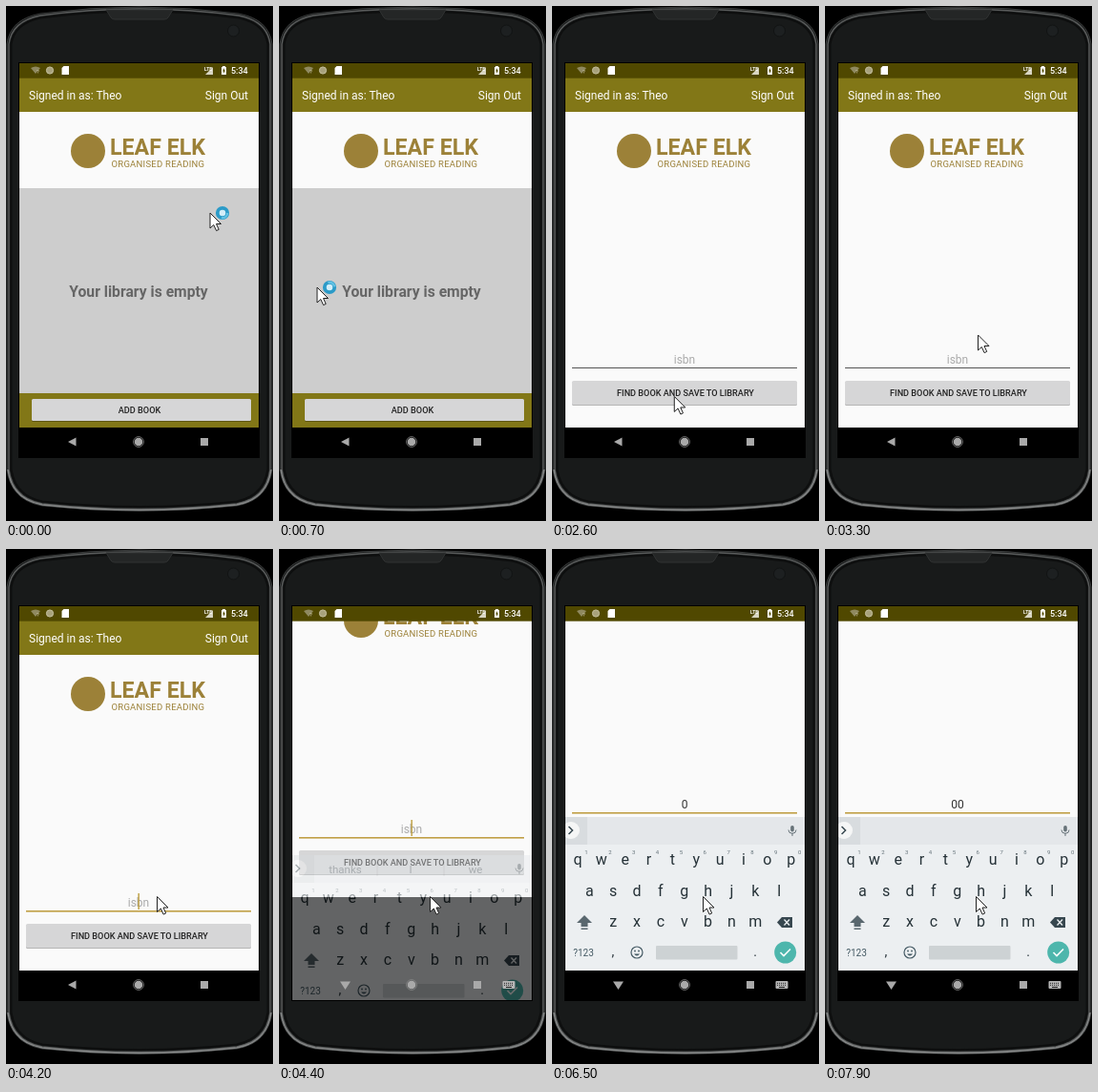
An HTML page that plays this animation: 280x540 px, repeating every 8000 ms.

```html
<!DOCTYPE html>
<html lang="en">
<head>
<meta charset="utf-8">
<title>Library app demo</title>
<style>
  html, body { margin: 0; width: 100%; height: 100%; overflow: hidden; background: #000; }
  svg { display: block; width: 280px; height: 540px; font-family: Roboto, "Noto Sans", sans-serif; }
  .wordmark { font-weight: 700; font-stretch: 75%; }
</style>
</head>
<body>
<svg id="stage" viewBox="0 0 280 540"></svg>
<script>
const LOOP = 8000, STEP = 100;
const OLIVE = '#827717', GOLD = '#9c8138';

const rect = (x, y, w, h, fill, extra = '') =>
  `<rect x="${x}" y="${y}" width="${w}" height="${h}" fill="${fill}" ${extra}/>`;
const circle = (x, y, r, fill, extra = '') =>
  `<circle cx="${x}" cy="${y}" r="${r}" fill="${fill}" ${extra}/>`;
const path = (d, fill, extra = '') => `<path d="${d}" fill="${fill}" ${extra}/>`;
const text = (x, y, size, fill, label, extra = '') =>
  `<text x="${x}" y="${y}" font-size="${size}" fill="${fill}" ${extra}>${label}</text>`;
const centered = (x, y, size, fill, label, extra = '') =>
  text(x, y, size, fill, label, `text-anchor="middle" ${extra}`);
const group = (id, body, extra = '') => `<g id="${id}" ${extra}>${body}</g>`;

const button = (x, y, w, h, label) =>
  rect(x, y + 1, w, h, '#000', 'rx="1.5" opacity=".28"') +
  rect(x, y, w, h, '#d6d6d7', 'rx="1.5"') +
  centered(140, y + h / 2 + 3.5, 9.15, '#222', label, 'font-weight="500"');

// Arched outline of the phone, inset from its outer edge.
const topArch = i => `${1 + i} 40Q${4 + i} ${14 + i} 36 ${8 + i}Q140 ${i - 6} 244 ${8 + i}Q${276 - i} ${14 + i} ${279 - i} 40`;
const bottomArch = i => `${279 - i} 486Q${275 - i} ${518 - i} 242 ${524 - i}Q140 ${535 - i} 38 ${524 - i}Q${5 + i} ${518 - i} ${1 + i} 486`;
const outline = i => `M${topArch(i)}L${bottomArch(i)}Z`;

const phone =
  path(outline(0), '#181a1a', 'stroke="#3a3c3c" stroke-width="1"') +
  path(outline(2), 'none', 'stroke="#5a5c5c" stroke-width="1.4"') +
  path(outline(4.5), 'none', 'stroke="#0d0e0e" stroke-width="2"') +
  path(`M${bottomArch(1)}`, 'none', 'stroke="#858787" stroke-width="1.5"') +
  path('M105 4H175L170 12Q169 14 166 14H114Q111 14 110 12Z', '#242626', 'stroke="#303232"') +
  circle(238.5, 26, 6, '#1d2021', 'stroke="#121414"') +
  rect(13, 59, 253, 415, '#000');

const statusBar =
  rect(14, 60, 251, 15.7, '#504800') +
  path('M26 65Q31 62 36 65L31 71Z', '#8f8960') + text(32, 71, 6, '#d0cbb0', '?') +
  circle(46, 67.5, 3.6, '#a8a27c', 'stroke="#c6c1a0" stroke-width="1"') +
  path('M60.5 63H66V72H58.5V65Z', '#fff') +
  path('M217 64V72H209Z', '#d8d5c2') + text(208, 68, 5, '#fff', 'LTE', 'font-weight="700"') +
  path('M226 64H227V63H230V64H231V72H226Z', '#fff') + path('M229 65L227 68.5H228.3V71L230 67.5H229Z', '#504800') +
  text(236, 71, 9, '#fff', '5:34', 'font-weight="500"');

const header =
  rect(14, 75, 251, 36, OLIVE) +
  text(24, 98, 12, '#fff', 'Signed in as: Theo') +
  text(254, 98, 12, '#fff', 'Sign Out', 'text-anchor="end"');

const brand =
  circle(86, 152, 18, GOLD) +
  text(109, 156, 30, GOLD, 'LEAF ELK', 'class="wordmark"') +
  text(110.5, 169, 9.5, GOLD, 'ORGANISED READING', 'letter-spacing=".25"');

const libraryPage =
  rect(14, 75, 251, 367, '#fafafa') + header + brand +
  rect(14, 191, 251, 215, '#cdcdcd') +
  centered(139, 304.5, 15.7, '#666', 'Your library is empty', 'font-weight="700"') +
  rect(14, 406, 251, 36, OLIVE) + button(27, 412, 230, 23, 'ADD BOOK') +
  rect(27, 412, 230, 23, '#000', 'id="press" opacity="0"');

const searchPage =
  rect(14, 75, 251, 367, '#fafafa') + header + brand +
  centered(139, 375, 12, '#aaa', 'isbn', 'id="field"') +
  rect(0, 361, 1.3, 17, '#b8962e', 'id="caret"') +
  rect(21, 379, 236, 1, '#555', 'id="underline"') +
  button(21, 393, 236, 25, 'FIND BOOK AND SAVE TO LIBRARY');

const keyRow = (letters, x, y) => [...letters].map((key, i) =>
  centered(x + i * 24.85, y, 16, '#263238', key)).join('');

const keyboard =
  rect(14, 281, 251, 192, '#eceff1') +
  rect(14, 281, 251, 29, '#e4e7ea') + rect(14, 281, 23, 29, '#d8dcdf') +
  circle(20, 295, 9, '#f5f6f6') + path('M17.5 291L21.5 295L17.5 299', 'none', 'stroke="#37474f" stroke-width="1.5"') +
  group('suggestions',
    centered(69.5, 299.5, 11.5, '#6b777d', 'thanks') + centered(138, 299.5, 11.5, '#6b777d', 'I') +
    centered(206, 299.5, 11.5, '#6b777d', 'we') +
    rect(102.5, 288, 1, 15, '#c3c9cc') + rect(172.5, 288, 1, 15, '#c3c9cc')) +
  rect(250.2, 290, 3.6, 6.5, '#667278', 'rx="1.8"') +
  path('M248 294.5Q248 298.3 252 298.3T256 294.5M252 298V301', 'none', 'stroke="#667278"') +
  keyRow('qwertyuiop', 27, 331) + keyRow('asdfghjkl', 39.3, 363.5) + keyRow('zxcvbnm', 64.2, 396) +
  [...'1234567890'].map((n, i) => centered(36 + i * 24.85, 320, 6, '#66747b', n)).join('') +
  path('M34 384L42 392H37.5V396H30.5V392H26ZM30.5 397.5H37.5V399H30.5Z', '#59676e') +
  path('M236 391.5L241 386H252V397H241Z', '#37474f') +
  path('M243.5 388.5L249 394.5M249 388.5L243.5 394.5', 'none', 'stroke="#eceff1" stroke-width="1.3"') +
  centered(33, 427, 10, '#455a64', '?123') + centered(64, 427, 14, '#263238', ',') +
  circle(89, 423, 6, 'none', 'stroke="#455a64" stroke-width="1.2"') +
  circle(87, 421.5, .9, '#455a64') + circle(91, 421.5, .9, '#455a64') +
  path('M86 424.5Q89 428.5 92 424.5Z', '#455a64') +
  rect(109, 416, 85.5, 14.5, '#cdd2d4', 'rx="1"') + centered(213, 427, 14, '#263238', '.') +
  circle(244.7, 423, 11.5, '#4db6ac') +
  path('M239.5 423L243 426.5L250 419.5', 'none', 'stroke="#fff" stroke-width="1.6"');

const navIcons =
  path('', '#a9a9a9', 'id="back"') +
  circle(139, 457, 4.3, '#a9a9a9') + circle(139, 457, 5.4, 'none', 'stroke="#888" stroke-width=".8"') +
  rect(204, 453, 8, 8, '#a9a9a9') +
  group('imeIcon', rect(234.5, 453, 13, 8, '#b5b5b5', 'rx="1"') +
    path('M236 455.3H246M236 457.3H246', 'none', 'stroke="#222" stroke-dasharray="1 1"') +
    rect(238, 459, 6, 1, '#222'));

const pointer =
  path('M0 0V16L3.8 12.5L6.6 18.6L9.2 17.4L6.5 11.5H11.5Z', '#fff', 'stroke="#222" stroke-width="1"') +
  group('busy', circle(13, 0, 5.2, '#d3eef8', 'stroke="#2b9bc8" stroke-width="3.8"') +
    circle(13, 0, 5.2, 'none', 'id="spin" stroke="#62c2e4" stroke-width="2.4" stroke-dasharray="9 24"'));

const stage = document.getElementById('stage');
stage.innerHTML =
  '<clipPath id="screen"><rect x="14" y="60" width="251" height="413"/></clipPath>' +
  '<clipPath id="window"><rect x="14" y="75" width="251" height="367"/></clipPath>' +
  phone + '<g clip-path="url(#screen)">' +
  `<g clip-path="url(#window)">${group('library', libraryPage)}${group('search', searchPage)}</g>` +
  group('keyboard', keyboard) + rect(14, 442, 251, 31, '#000', 'id="navBar"') + navIcons + statusBar +
  '</g>' + group('pointer', pointer);

const el = Object.fromEntries([...stage.querySelectorAll('[id]')].map(node => [node.id, node]));

// Keep both wordmarks inside the brand area when no condensed face is available.
for (const mark of stage.querySelectorAll('.wordmark')) {
  mark.setAttribute('font-size', Math.min(30, 30 * 100 / mark.getComputedTextLength()));
}

const pointerKeys = [
  [0, 214, 217], [700, 40, 295], [900, 40, 296], [1700, 117, 430],
  [2300, 117, 432], [3200, 160.5, 345], [3400, 160.5, 345], [3700, 158.5, 364.5]
];

const clamp = v => Math.max(0, Math.min(1, v));
const smooth = u => u * u * (3 - 2 * u);
const progress = (t, start, end) => clamp((t - start) / (end - start));
const between = (t, start, end) => t >= start && t < end;
const show = (node, on) => node.setAttribute('visibility', on ? 'visible' : 'hidden');

function pointerAt(t) {
  const next = pointerKeys.findIndex(key => key[0] > t);
  if (next < 0) return pointerKeys.at(-1).slice(1);
  const [t0, x0, y0] = pointerKeys[next - 1], [t1, x1, y1] = pointerKeys[next];
  const u = smooth(progress(t, t0, t1));
  return [x0 + (x1 - x0) * u, y0 + (y1 - y0) * u];
}

function render(time) {
  const t = Math.floor(time % LOOP / STEP) * STEP;
  const [x, y] = pointerAt(t);
  el.pointer.setAttribute('transform', `translate(${x} ${y})`);
  show(el.busy, t < 2100);
  el.spin.setAttribute('transform', `rotate(${t * .36} 13 0)`);
  el.press.setAttribute('opacity', between(t, 2000, 2300) ? .12 : 0);

  const opening = progress(t, 2200, 2500);
  const slide = progress(t, 4200, 4600);
  const pan = Math.round(103 * (1 - (1 - slide) ** 2));
  show(el.library, t < 2500);
  el.search.setAttribute('opacity', opening);
  el.search.setAttribute('transform', `translate(0 ${30 * (1 - opening) ** 2 - pan})`);

  el.keyboard.setAttribute('opacity', slide ** 1.25);
  el.keyboard.setAttribute('transform', `translate(0 ${80 * (1 - slide)})`);
  show(el.suggestions, t < 5900);
  show(el.navBar, slide === 0 || slide === 1);
  show(el.imeIcon, slide > 0);
  el.back.setAttribute('d', slide > 0 ? 'M64 453.5H75L69.5 462Z' : 'M65 457L73.5 452.5V461.5Z');

  const typed = t < 5900 ? '' : t < 6900 ? '0' : '00';
  const focused = t >= 3900;
  el.field.textContent = typed || 'isbn';
  el.field.setAttribute('fill', typed ? '#333' : '#aaa');
  el.underline.setAttribute('fill', focused ? '#c09f45' : '#555');
  el.underline.setAttribute('height', focused ? 1.6 : 1);
  el.caret.setAttribute('x', 138.5 + typed.length * 3.5);
  show(el.caret, between(t, 3900, 5400) || between(t, 5900, 6500) || between(t, 6900, 7500));
}

const start = performance.now();
function tick() {
  render(performance.now() - start);
  requestAnimationFrame(tick);
}
tick();
</script>
</body>
</html>
```
